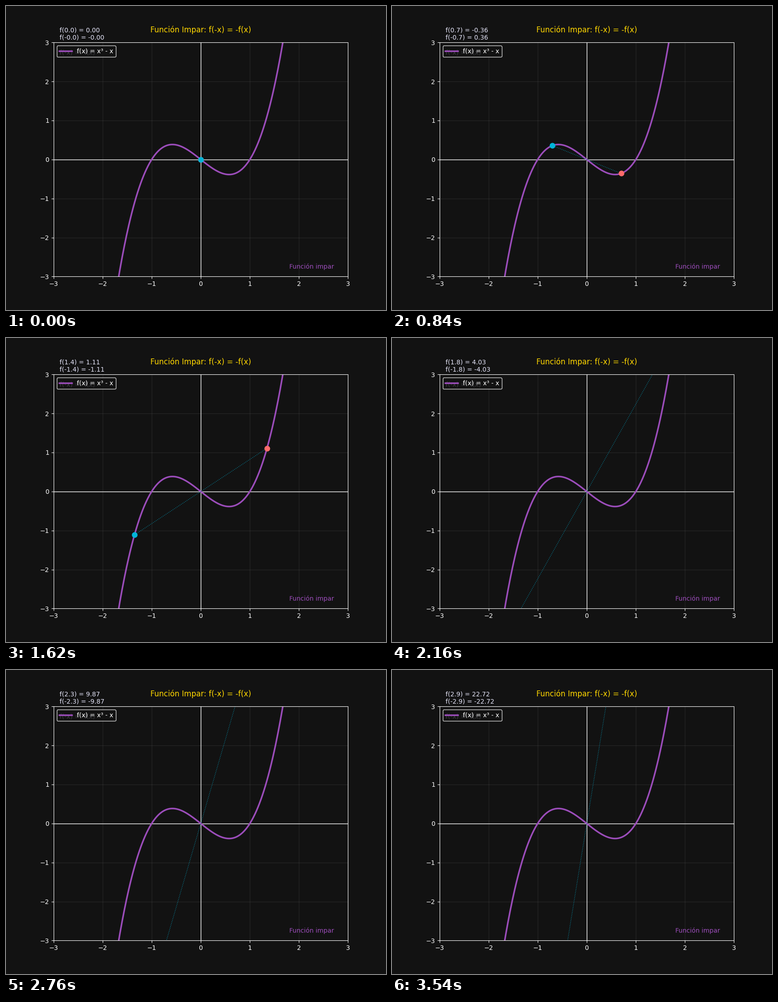
A matplotlib script that plays this animation: 837x669 px, repeating every 3600 ms.

```python
import numpy as np
import matplotlib.pyplot as plt
from matplotlib.animation import FuncAnimation

WIDTH, HEIGHT, DPI = 837, 669, 100
FRAMES, INTERVAL = 60, 60
X_MAX = 3

BACKGROUND = "#121212"
PURPLE = "#9c4dbb"
CYAN = "#00b4d8"
CORAL = "#ff6b6b"
GOLD = "#ffd700"
LAVENDER = "#e6e6fa"

plt.rcParams["font.family"] = "DejaVu Sans"


def cubic(x):
    return x**3 - x


# The small margin keeps the pixel size from being truncated down.
size = ((WIDTH + 0.01) / DPI, (HEIGHT + 0.01) / DPI)
fig, ax = plt.subplots(figsize=size, dpi=DPI)
fig.patch.set_facecolor(BACKGROUND)
ax.set_facecolor(BACKGROUND)
ax.set_xlim(-X_MAX, X_MAX)
ax.set_ylim(-3, 3)
ax.set_xticks(range(-3, 4))
ax.set_yticks(range(-3, 4))
ax.tick_params(colors="white")
for spine in ax.spines.values():
    spine.set_color("white")
ax.grid(color="gray", alpha=0.2)
ax.axhline(0, color="white", lw=1)
ax.axvline(0, color="white", lw=1)

xs = np.linspace(-X_MAX, X_MAX, 400)
ax.plot(xs, cubic(xs), color=PURPLE, lw=2.5, label="f(x) = x³ - x")

link, = ax.plot([], [], ":", color=CYAN, lw=1, alpha=0.7)
right_dot, = ax.plot([], [], "o", color=CORAL, ms=8)
left_dot, = ax.plot([], [], "o", color=CYAN, ms=8)

# The last line of this text sits behind the translucent legend.
values = ax.text(0.02, 0.95, "", transform=ax.transAxes, color=LAVENDER)
ax.text(1.8, -2.8, "Función impar", color=PURPLE)
ax.set_title("Función Impar: f(-x) = -f(x)", color=GOLD, fontsize=12, pad=16)
ax.legend(loc="upper left", facecolor=BACKGROUND, edgecolor="white",
          labelcolor="white", framealpha=0.8)


def update(frame):
    x = frame / FRAMES * X_MAX
    y = cubic(x)
    right_dot.set_data([x], [y])
    left_dot.set_data([-x], [-y])
    link.set_data([x, -x], [y, -y])
    values.set_text(f"f({x:.1f}) = {y:.2f}\n"
                    f"f({-x:.1f}) = {-y:.2f}\n\n"
                    "f(-x) = -f(x)")
    return link, right_dot, left_dot, values


anim = FuncAnimation(fig, update, frames=FRAMES, interval=INTERVAL,
                     init_func=lambda: update(0), repeat=True, repeat_delay=0)
plt.show()
```
